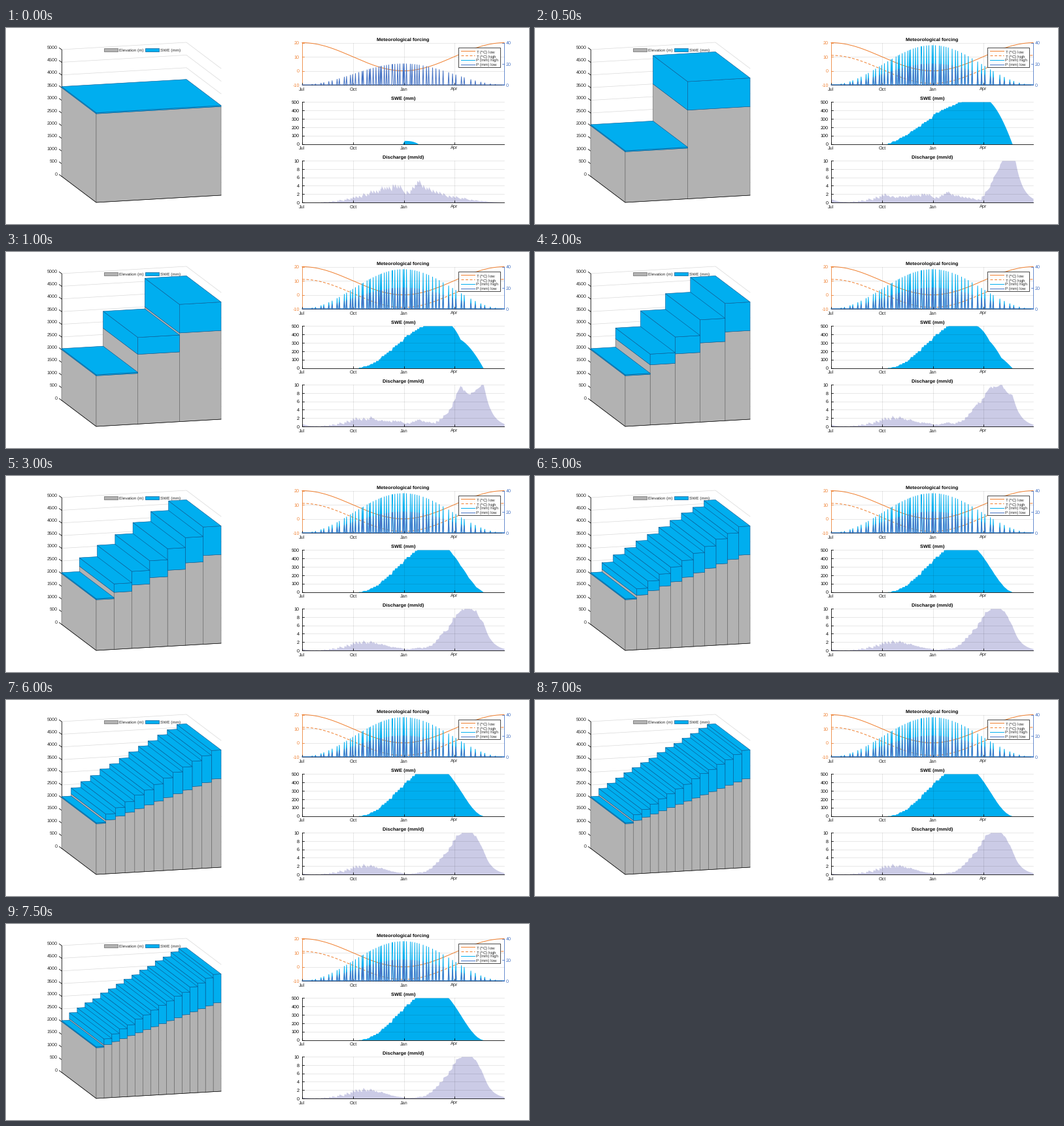
Recreate the animation shown at these times as a matplotlib script. Size 800 by 300 pixels, loop 8 s.

```python
import numpy as np
import matplotlib.pyplot as plt
from matplotlib.animation import FuncAnimation
from matplotlib.patches import Polygon, Rectangle

PT = 0.72  # points per pixel at 100 dpi
BLUE, BLUE_EDGE = "#00aeef", "#0a5c96"
GRAY, GRAY_EDGE = "#b2b2b2", "#6a6a6a"
ORANGE, RAIN, LILAC = "#f08030", "#4472c4", "#cbcbe6"
GRID = "#d9d9d9"
DASH = (0, (4, 2.5))

plt.rcParams["font.family"] = "Liberation Sans"
plt.rcParams["text.hinting"] = "no_hinting"
fig = plt.figure(figsize=(8, 3), dpi=100, facecolor="white")
ax = fig.add_axes([0, 0, 1, 1])
ax.set(xlim=(0, 800), ylim=(300, 0))
ax.axis("off")


def line(x, y, color="black", width=0.8, z=2, **kw):
    return ax.plot(x, y, color=color, lw=width * PT, zorder=z, **kw)[0]


def text(x, y, s, size=7.3, ha="center", color="#262626", z=9, **kw):
    ax.text(x, y, s, fontsize=size * PT, ha=ha, va="center_baseline",
            color=color, zorder=z, **kw)


def box(x, y, w, h, fill, edge, z=8):
    ax.add_patch(Rectangle((x, y), w, h, fc=fill, ec=edge, lw=0.7 * PT, zorder=z))


# ---- catchment model -----------------------------------------------
LAPSE = 9         # cooling from lowest to highest zone, deg C
WETTER = 0.87     # extra precipitation in the highest zone
MELT = 4          # mm per degree and day
RUNOFF = 0.8      # share of rain that reaches the stream
STORAGE = 14      # reservoir time constant, days

days = np.arange(365)
season = np.cos(2 * np.pi * days / 365)
temp = 10 + 10 * season


def make_rain():
    """Wet days, most frequent in early winter, heaviest in midwinter."""
    rng = np.random.default_rng(4)
    rain, d = np.zeros(365), 16
    while d < 355:
        day = int(round(d + rng.uniform(-2, 2)))
        rain[day] = 10 * (1 - season[day])
        d += 6.6 - 2.7 * np.cos(2 * np.pi * (d - 150) / 365)
    return rain


rain = make_rain()


def run_zone(rel):
    """Daily snow and stream input of the zone at relative elevation rel."""
    t = temp - LAPSE * rel
    p = rain * (1 + WETTER * rel)
    snow, water, pack = np.zeros(365), np.zeros(365), 0
    for d in days:
        cold = t[d] < 0.02
        melt = min(pack, MELT * max(t[d], 0))
        pack += p[d] * cold - melt
        snow[d] = pack
        water[d] = melt + RUNOFF * p[d] * (not cold)
    return snow, water


def run_catchment(n):
    """Snow depth of every zone, mean snow and discharge of n zones."""
    zones = [run_zone(rel) for rel in np.linspace(0, 1, n)]
    snow, water = np.array(zones).transpose(1, 0, 2)
    flow, store = [], 0
    for inflow in np.tile(water.mean(axis=0), 2):  # first year is spin-up
        store += inflow
        flow.append(store / STORAGE)
        store -= flow[-1]
    return snow.max(axis=1), snow.mean(axis=0), np.array(flow[365:])


# ---- block diagram -------------------------------------------------
ORIGIN = np.array([85, 227])
ALONG = np.array([191, -11])
DEPTH = np.array([53, 40])
M = 194 / 5000  # pixels per metre


def project(u, v, height):
    return ORIGIN + u * ALONG + v * DEPTH - np.array([0, height * M])


def draw_block_axes():
    for level in range(0, 5001, 500):
        wall = np.array([project(u, v, level) for u, v in ((0, 0), (1, 0), (1, 1))])
        line(*wall.T, color=GRID, width=0.7, z=1)
        y = wall[0, 1]
        line([81.5, 85], [y - 2.6, y])
        text(79, y - 4, str(level), ha="right")
    line([85, 85], [227, 33])
    front = np.array([project(0, 0, 0), project(0, 1, 0), project(1, 1, 0)])
    line(*front.T, width=0.7, z=6)
    box(150, 31, 21, 5, GRAY, GRAY_EDGE)
    text(173, 33.7, "Elevation (m)", 6.4, "left")
    box(213, 31, 21, 5, BLUE, BLUE_EDGE)
    text(236, 33.7, "SWE (mm)", 6.4, "left")


def face(corners, fill, edge, z):
    patch = Polygon([project(*c) for c in corners], fc=fill, ec=edge,
                    lw=0.6 * PT, joinstyle="round", zorder=z)
    return ax.add_patch(patch)


def draw_blocks(depths):
    n = len(depths)
    grounds = np.linspace(3500, 2000, n)[::-1] if n > 1 else [3500]
    faces = []
    for i, (ground, depth) in enumerate(zip(grounds, depths)):
        top = ground + depth
        a, b = i / n, (i + 1) / n
        z = 4 - a  # nearer blocks on the left
        for lo, hi, fill, edge in ((0, ground, GRAY, GRAY_EDGE),
                                   (ground, top, BLUE, BLUE_EDGE)):
            faces.append(face([(a, 0, lo), (a, 1, lo), (a, 1, hi), (a, 0, hi)], fill, edge, z))
            faces.append(face([(a, 1, lo), (b, 1, lo), (b, 1, hi), (a, 1, hi)], fill, edge, z))
        faces.append(face([(a, 0, top), (a, 1, top), (b, 1, top), (b, 0, top)],
                          BLUE, BLUE_EDGE, z))
    return faces


# ---- time series ---------------------------------------------------
LEFT, RIGHT = 453, 762
xs = LEFT + days * (RIGHT - LEFT) / 364


def scale(v, top, bottom, lo, hi):
    return bottom - (np.asarray(v) - lo) * (bottom - top) / (hi - lo)


def temp_y(v):
    return scale(v, 22.5, 87, -10, 20)


def rain_y(v):
    return scale(v, 22.5, 87, 0, 40)


def grid(x, y):
    line(x, y, width=0.6, z=2.5, alpha=0.15)


def draw_panel(title, top, bottom, lo, hi, step, color="black"):
    text((LEFT + RIGHT) / 2, top - 6, title, 7.5, color="black", weight="bold")
    for v in range(lo, hi + 1, step):
        y = scale(v, top, bottom, lo, hi)
        grid([LEFT, RIGHT], [y, y])
        line([LEFT, LEFT + 3], [y, y], color, z=5)
        text(449, y + 0.2, str(v), ha="right", color=color)
    line([LEFT, RIGHT], [bottom, bottom], z=5)
    line([LEFT, LEFT], [top, bottom], color, z=5)
    for name, d in (("Jul", 0), ("Oct", 92), ("Jan", 184), ("Apr", 274)):
        grid([xs[d]] * 2, [top, bottom])
        line([xs[d]] * 2, [bottom, bottom - 3], z=5)
        text(xs[d], bottom + 6, name)


def draw_forcing():
    draw_panel("Meteorological forcing", 22.5, 87, -10, 20, 10, ORANGE)
    line([RIGHT, RIGHT], [22.5, 87], RAIN, z=5)
    for v in (0, 20, 40):
        line([RIGHT - 3, RIGHT], [rain_y(v)] * 2, RAIN, z=5)
        text(765, rain_y(v) + 0.2, str(v), ha="left", color=RAIN)
    line(xs, temp_y(temp), ORANGE, 1, z=3)
    line(xs, rain_y(rain), RAIN, 1, z=6)
    box(692, 29.5, 63.5, 30.5, "white", "black")
    rows = ((r"T ($^{\mathregular{o}}$C) low", ORANGE, "-"),
            (r"T ($^{\mathregular{o}}$C) high", ORANGE, DASH),
            ("P (mm) high", BLUE, "-"),
            ("P (mm) low", RAIN, "-"))
    for i, (label, color, style) in enumerate(rows):
        y = 35.2 + 6.8 * i
        line([696, 717], [y, y], color, 1, z=9, ls=style)
        text(719, y, label, 6.3, "left")


def area(values, top, bottom, hi, color):
    y = scale(np.minimum(values, hi), top, bottom, 0, hi)
    return ax.fill_between(xs, y, bottom, color=color, lw=0, zorder=2)


draw_block_axes()
draw_forcing()
draw_panel("SWE (mm)", 113, 177.5, 0, 500, 100)
draw_panel("Discharge (mm/d)", 203, 267, 0, 10, 2)
high_lines = [line(xs, temp_y(temp - LAPSE), ORANGE, 1, z=3, ls=DASH),
              line(xs, rain_y(rain * (1 + WETTER)), BLUE, 1, z=4)]
parts = []


def update(i):
    n = i + 1
    while parts:
        parts.pop().remove()
    for h in high_lines:
        h.set_visible(n > 1)
    depths, snow, flow = run_catchment(n)
    parts.extend(draw_blocks(depths))
    parts.append(area(snow, 113, 177.5, 500, BLUE))
    parts.append(area(flow, 203, 267, 10, LILAC))
    return parts


anim = FuncAnimation(fig, update, frames=16, init_func=lambda: [],
                     interval=500, repeat=True, repeat_delay=0, blit=False)
plt.show()
```
